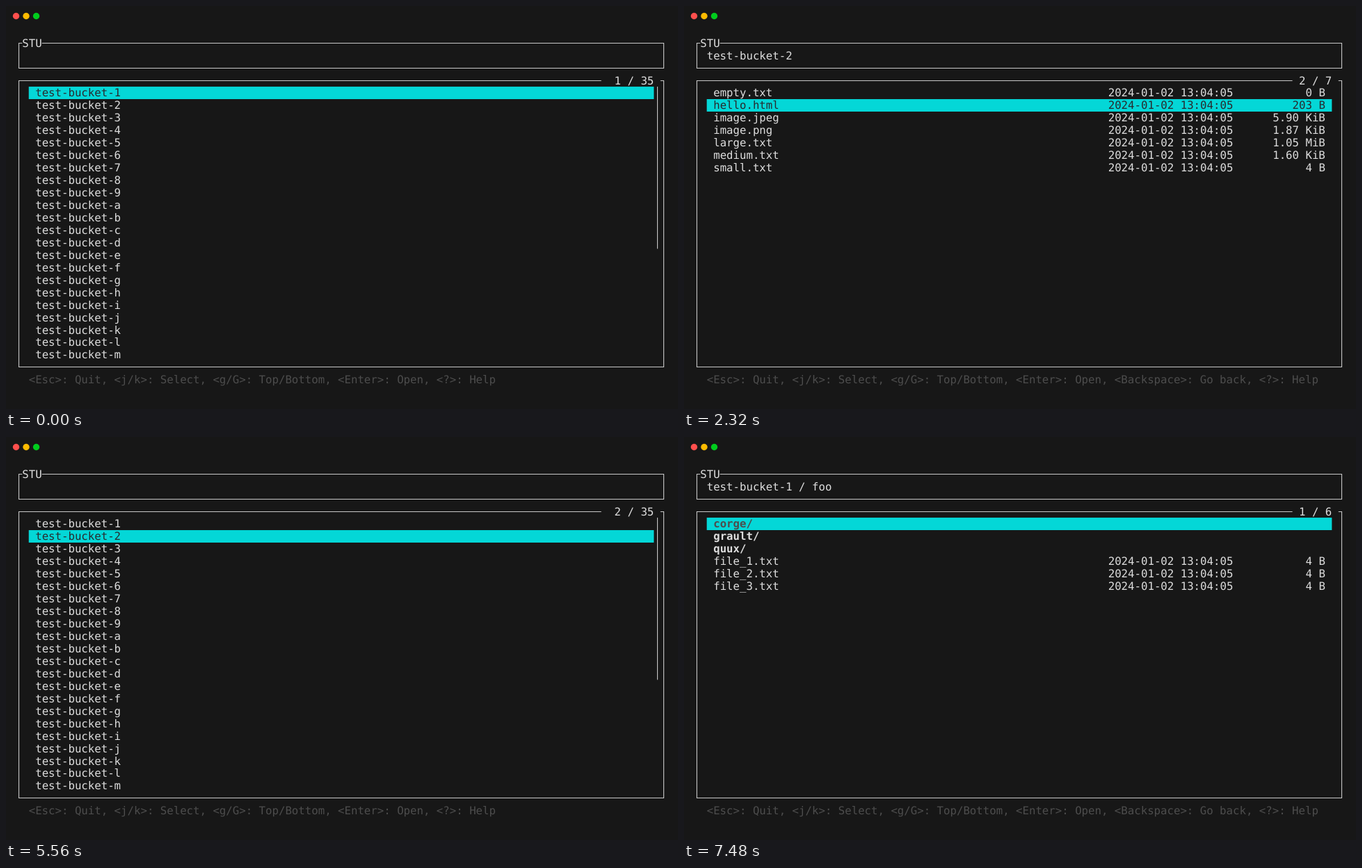
Animation, 966 px wide and 580 px high, one loop 8 s. Source, as an HTML page:

```html
<!DOCTYPE html>
<html lang="en">
<head>
<meta charset="utf-8">
<title>STU</title>
<style>
  html, body { margin: 0; width: 100%; height: 100%; overflow: hidden; background: #171717; }
  svg { display: block; width: 966px; height: 580px; }
  text {
    font: 15.711px "DejaVu Sans Mono", Menlo, monospace;
    fill: #ddd;
    white-space: pre;
    text-rendering: geometricPrecision;
  }
  path { fill: none; stroke: #c8c8c8; stroke-width: 1.1; }
  .bold { font-weight: bold; }
  .cyan { fill: #00fefe; }
  .dim { fill: #4d4d4d; }
  .dark { fill: #282a2e; }
  .mark { stroke: #04d7d7; stroke-width: 2; }
  .bar { fill: #04d7d7; }
  .idle { fill: #4d4d4d; }
</style>
</head>
<body>
<svg id="stage" viewBox="0 0 966 580">
  <circle cx="14.5" cy="14.5" r="4.7" fill="#ff4f4d"/>
  <circle cx="29" cy="14.5" r="4.7" fill="#febb00"/>
  <circle cx="43.5" cy="14.5" r="4.7" fill="#00cc1d"/>
</svg>
<script>
const NS = 'http://www.w3.org/2000/svg';
const stage = document.getElementById('stage');
const CELL_W = 9.459, CELL_H = 17.95, LOOP = 8000;

// Terminal grid: left edge and line centre of a column, centre of a row
const colX = c => 13.8 + CELL_W * c;
const midX = c => Math.floor(colX(c + 0.5)) + 0.5;
const rowY = r => 53.25 + CELL_H * r;
const midY = r => Math.floor(rowY(r)) + 0.5;

let layer;

function add(tag, attrs, content) {
  const el = document.createElementNS(NS, tag);
  for (const key in attrs) el.setAttribute(key, attrs[key]);
  if (content) el.textContent = content;
  layer.appendChild(el);
}

const text = (c, r, str, cls = '') =>
  add('text', { x: colX(c), y: rowY(r) + 5.4, class: cls }, str);
const textEnd = (c, r, str, cls) => text(c - str.length, r, str, cls);
const line = (d, cls = '') => add('path', { d, class: cls });
const rule = (c1, c2, r) => line(`M${colX(c1)} ${midY(r)}H${colX(c2)}`);
const upright = (c, r1, r2, cls) =>
  line(`M${midX(c)} ${rowY(r1 - 0.5)}V${rowY(r2 + 0.5)}`, cls);

// Box whose top edge is broken between two columns
function box(c1, c2, r1, r2, gapFrom = c1 + 1, gapTo = gapFrom) {
  line(`M${colX(gapFrom)} ${midY(r1)}H${midX(c1)}V${midY(r2)}H${midX(c2)}V${midY(r1)}H${colX(gapTo)}`);
}

const STAMP = '2024-01-02 13:04:05';
const QUIT = '<Esc>: Quit, ';
const BROWSE = QUIT + '<j/k>: Select, <g/G>: Top/Bottom, <Enter>: Open, ';
const HELP = '<?>: Help';

const buckets = [...'123456789abcdefghijklm'].map(id => ['test-bucket-' + id]);
const files = [
  ['empty.txt', '0 B'], ['hello.html', '203 B'], ['image.jpeg', '5.90 KiB'],
  ['image.png', '1.87 KiB'], ['large.txt', '1.05 MiB'],
  ['medium.txt', '1.60 KiB'], ['small.txt', '4 B']
];
const note = n => [`file_${n}.txt`, '4 B'];
const root = [['bar/'], ['baz/'], ['foo/'], ['qux/'], note(1), note(2)];
const foo = [['corge/'], ['grault/'], ['quux/'], note(1), note(2), note(3)];

function frame(path, help) {
  box(0, 98, 0, 2, 1, 4);
  text(1, 0, 'STU');
  if (path) text(2, 1, path);
  text(2, 27, help, 'dim');
}

function list(items, selected, right, total, active = true) {
  const count = `${selected} / ${total}`;
  const gap = total > 9 ? 9 : 7;
  box(0, right, 3, 26, right - gap, right);
  textEnd(right - 1, 3, count);
  add('rect', {
    x: colX(2), y: rowY(selected + 2.5), height: CELL_H,
    width: CELL_W * (right - 3), class: active ? 'bar' : 'idle'
  });
  items.forEach(([name, size], i) => {
    const r = i + 4, on = i + 1 === selected, folder = name.endsWith('/');
    const tone = on ? (folder ? 'dim' : 'dark') : '';
    text(3, r, name, folder ? tone + ' bold' : tone);
    if (size && active) {
      text(63, r, STAMP, tone);
      textEnd(96, r, size, tone);
    }
  });
}

function bucketView(selected) {
  frame('', BROWSE + HELP);
  list(buckets, selected, 98, 35);
  upright(97, 4, 16);
}

function objectView(path, items, selected) {
  frame(path, BROWSE + '<Backspace>: Go back, ' + HELP);
  list(items, selected, 98, items.length);
}

function detailView(tab) {
  frame('test-bucket-2', QUIT +
    '<h/l>: Select tabs, <s/S>: Download, <p>: Preview, <Backspace>: Close, ' + HELP);
  list(files, 3, 49, 7, false);
  box(50, 98, 3, 26);
  text(52, 4, 'Detail', tab === 0 ? 'bold cyan' : '');
  upright(59, 4, 4);
  text(61, 4, 'Version', tab === 1 ? 'bold cyan' : '');
  rule(51, 98, 5);
  if (tab === 0) {
    [
      ['Name:', 'image.jpeg'], ['Size:', '5.90 KiB'], ['Last Modified:', STAMP],
      ['ETag:', 'c0ed5193ead922c0397be8f8b23397ee'], ['Content-Type:', 'image/jpeg']
    ].forEach(([label, value], i) => {
      text(52, 6 + i * 3, label, 'bold');
      text(53, 7 + i * 3, value);
    });
  } else {
    upright(51, 6, 8, 'mark');
    [['Version ID:', 'null'], ['Last Modified:', STAMP], ['Size:', '5.90 KiB']]
      .forEach(([label, value], i) => {
        textEnd(67, 6 + i, label, 'bold');
        text(68, 6 + i, value);
      });
    rule(51, 98, 9);
  }
}

const bucket1 = n => objectView('test-bucket-1', root, n);
const bucket2 = n => objectView('test-bucket-2', files, n);

const steps = [
  [0, bucketView, 1], [720, bucketView, 2], [960, bucketView, 3], [1200, bucketView, 2],
  [1600, bucket2, 1], [2320, bucket2, 2], [2480, bucket2, 3],
  [2720, detailView, 0], [3600, detailView, 1], [4280, detailView, 0],
  [5040, bucket2, 3], [5560, bucketView, 2], [5880, bucketView, 1],
  [6200, bucket1, 1], [6960, bucket1, 2], [7200, bucket1, 3],
  [7480, () => objectView('test-bucket-1 / foo', foo, 1)]
];

const screens = steps.map(([at, view, arg]) => {
  layer = document.createElementNS(NS, 'g');
  layer.style.display = 'none';
  view(arg);
  stage.appendChild(layer);
  return { at, el: layer };
});

const start = performance.now();
let shown;

function tick() {
  const t = (performance.now() - start) % LOOP;
  const next = screens.findLast(s => s.at <= t);
  if (next !== shown) {
    if (shown) shown.el.style.display = 'none';
    next.el.style.display = '';
    shown = next;
  }
  requestAnimationFrame(tick);
}
tick();
</script>
</body>
</html>
```
